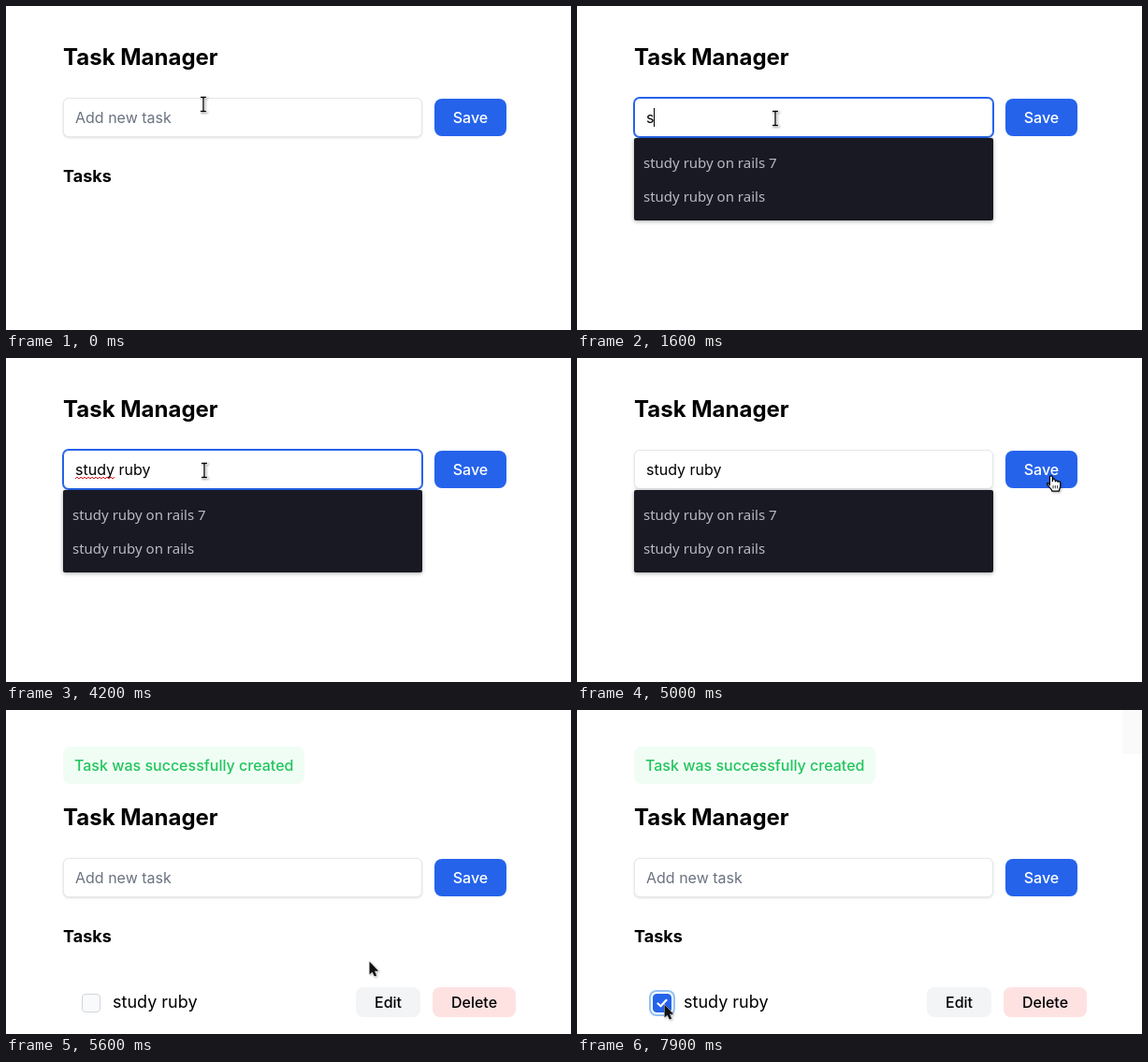
An HTML page for the animation above (8 s loop, 604 by 346 pixels).

```html
<!DOCTYPE html>
<html lang="en">
<head>
<meta charset="utf-8">
<title>Task Manager</title>
<style>
  html, body { margin: 0; width: 100%; height: 100%; overflow: hidden; background: #fff; }
  body { position: relative; font: 16px/24px Inter, sans-serif; color: #000; }
  #stage { position: absolute; left: 0; top: 0; width: 604px; height: 346px; overflow: hidden; }
  #stage div, #stage svg, h1, h2 { position: absolute; box-sizing: border-box; margin: 0; white-space: pre; }
  [hidden] { display: none !important; }

  #notice { left: 61px; top: 39px; height: 40px; padding: 0 12px; line-height: 40px; border-radius: 8px;
    background: #f0fdf4; color: #22c55e; font-weight: 500; }
  #page { left: 0; top: 0; width: 604px; height: 346px; }
  h1 { left: 61px; top: 39px; font-size: 24px; line-height: 32px; font-weight: 700; }
  h2 { left: 61px; top: 168px; font-size: 18px; line-height: 28px; font-weight: 700; }

  #field { left: 61px; top: 98px; width: 384px; height: 42px; padding: 0 12px; line-height: 40px;
    border: 1px solid #e5e7eb; border-radius: 6px; background: #fff;
    box-shadow: 0 1px 3px rgba(0,0,0,.1), 0 1px 2px -1px rgba(0,0,0,.1); }
  #field.focus { border-color: #2563eb; box-shadow: 0 0 0 1px #2563eb; }
  #hint { left: 12px; top: 0; color: #6b7280; }
  #caret { display: inline-block; width: 1px; height: 20px; margin-right: -1px; background: #000; vertical-align: -4px; }
  #squiggle { left: 12px; top: 27px; }

  .button { height: 32px; line-height: 32px; border-radius: 8px; text-align: center; font-weight: 500; }
  #save { left: 458px; top: 99px; width: 77px; height: 40px; line-height: 40px; background: #2563eb; color: #fff; }
  #edit { left: 374px; top: 296px; width: 69px; background: #f3f4f6; }
  #delete { left: 456px; top: 296px; width: 89px; background: #fee2e2; }

  #list { left: 61px; top: 141px; width: 384px; padding: 8px 10px; border-radius: 2px; background: #181923;
    color: #b9bac4; font: 15px/36px "Noto Sans", sans-serif; box-shadow: 0 1px 4px rgba(0,0,0,.35); }

  #box { left: 81px; top: 303px; width: 20px; height: 20px; border: 1px solid #d1d5db; border-radius: 4px; background: #f9fafb; }
  #box.on { border-color: #2563eb; background: #2563eb; box-shadow: 0 0 0 2px #fff, 0 0 0 4px #93c1f5; }
  #box svg { left: 3px; top: 3px; }
  #label { left: 114px; top: 298px; font-size: 18px; line-height: 28px; }
  #corner { left: 583px; top: 0; width: 21px; height: 47px; background: #fafafa; }

  #cursor { left: 0; top: 0; overflow: visible; filter: drop-shadow(1px 1px 1px rgba(0,0,0,.3)); }
</style>
</head>
<body>
<div id="stage">
  <div id="notice">Task was successfully created</div>
  <div id="page">
    <h1>Task Manager</h1>
    <div id="field"><div id="hint">Add new task</div><span id="typed"></span><span id="caret"></span>
      <svg id="squiggle" width="42" height="4" fill="none" stroke="#e01b24"><path/></svg></div>
    <div id="save" class="button">Save</div>
    <h2>Tasks</h2>
  </div>
  <div id="task">
    <div id="box"><svg width="12" height="12" fill="none" stroke="#fff" stroke-width="2.2" stroke-linecap="round" stroke-linejoin="round"><path d="M1.5 6.5 4.5 9.3 10.5 2.8"/></svg></div>
    <div id="label">study ruby</div>
    <div id="edit" class="button">Edit</div>
    <div id="delete" class="button">Delete</div>
  </div>
  <div id="list"></div>
  <div id="corner"></div>
  <svg id="cursor" width="20" height="20">
    <g id="text" fill="none" stroke-linecap="round">
      <path d="M-2.5-7.5H2.5M-2.5 7.5H2.5M0-7.5V7.5" stroke="#fff" stroke-width="3"/>
      <path d="M-2.5-7.5H2.5M-2.5 7.5H2.5M0-7.5V7.5" stroke="#000" stroke-width="1.3"/>
    </g>
    <path id="arrow" d="M.5.5V14.5L3.6 11.8 5.8 16.6 8.2 15.5 6 10.8H10.2Z" fill="#111" stroke="#fff" stroke-width=".8" paint-order="stroke"/>
    <g id="hand" stroke="#000" stroke-linejoin="round" stroke-linecap="round">
      <path d="M-1.6 9.8V1.3C-1.6-.5 1.3-.5 1.3 1.3V5.6C2-.0 4.4 4.4 4.4 6 4.7 4.4 7 4.8 7.1 6.4 7.5 5.2 9.7 5.8 9.7 7.5V11C9.7 12.6 8.5 13.4 8.3 16.2H.9C.6 14.2-2.6 11.4-4.2 9.3-5.3 7.5-3.3 6.5-1.6 9.8Z" fill="#fff" stroke-width="1.2"/>
      <path d="M2 10.5V13M4.3 10.5V13M6.6 10.5V13" stroke-width=".8"/>
    </g>
  </svg>
</div>
<script>
const LOOP = 8000, STEP = 100;
const $ = id => document.getElementById(id);
const show = (id, on) => $(id).toggleAttribute('hidden', !on);
const within = (t, from, to) => t >= from && t < to;

const allTasks = ['Estudar Ruby', 'Ler um livro de matemática aplicada', 'study ruby on rails 7',
  'Estudar XP', 'Ler um livro', 'Ler um livro de matemática'];
const matches = ['study ruby on rails 7', 'study ruby on rails'];

const phrase = 'study ruby';
const keyTimes = [1600, 1900, 2200, 2300, 2400, 2700, 3000, 3200, 3400, 3600];

// time, shape, hotspot x, y
const pointer = [
  [0, 'text', 211, 105], [100, 'text', 211, 114], [200, 'text', 211, 122], [1000, 'text', 212, 120],
  [4600, 'text', 228, 121], [4700, 'text', 290, 125], [4800, 'text', 390, 130],
  [4900, 'hand', 485, 129], [5000, 'hand', 507, 126], [5200, 'hand', 509, 127],
  [5300, 'arrow', 500, 145], [5400, 'arrow', 449, 211], [5500, 'arrow', 425, 240],
  [5600, 'arrow', 388, 268], [5700, 'arrow', 345, 290], [5800, 'arrow', 310, 303],
  [5900, 'arrow', 282, 305], [6000, 'arrow', 262, 299], [6100, 'arrow', 251, 292],
  [6300, 'arrow', 248, 292], [6400, 'arrow', 246, 292], [6600, 'arrow', 240, 293],
  [6700, 'arrow', 222, 298], [6800, 'arrow', 196, 305], [6900, 'arrow', 168, 312],
  [7000, 'arrow', 142, 317], [7100, 'arrow', 122, 319], [7200, 'arrow', 108, 319],
  [7300, 'arrow', 98, 318], [7400, 'arrow', 94, 317], [7900, 'arrow', 93, 314]
];

$('squiggle').firstElementChild.setAttribute('d',
  'M0 3' + Array.from({ length: 21 }, (_, i) => `L${i * 2 + 2} ${i % 2 ? 3 : 1}`).join(''));

function movePointer(t) {
  const [, shape, x, y] = pointer.findLast(p => p[0] <= t);
  for (const id of ['text', 'arrow', 'hand']) $(id).style.display = id === shape ? '' : 'none';
  $('cursor').style.transform = `translate(${x}px, ${y}px)`;
}

function render(t) {
  const saved = t >= 5300;
  const focused = within(t, 700, 5000);
  const typed = saved ? '' : phrase.slice(0, keyTimes.filter(k => k <= t).length);
  const blinkedOff = within(t, 1300, 1600) || within(t, 4200, 4700);

  $('page').style.top = saved ? '60px' : '0';
  show('notice', saved);
  show('task', saved);

  $('field').className = focused ? 'focus' : '';
  $('typed').textContent = typed;
  show('hint', !typed);
  show('caret', focused && !blinkedOff);
  show('squiggle', focused && typed.length > 5);

  show('list', within(t, 700, 5100));
  $('list').textContent = (typed ? matches : allTasks).join('\n');

  const checked = t >= 7900;
  $('box').className = checked ? 'on' : '';
  $('box').firstElementChild.style.display = checked ? '' : 'none';
  show('corner', checked);
  movePointer(t);
}

const start = performance.now();
function tick() {
  const t = (performance.now() - start) % LOOP;
  render(Math.floor(t / STEP) * STEP);
  requestAnimationFrame(tick);
}
tick();
</script>
</body>
</html>
```
